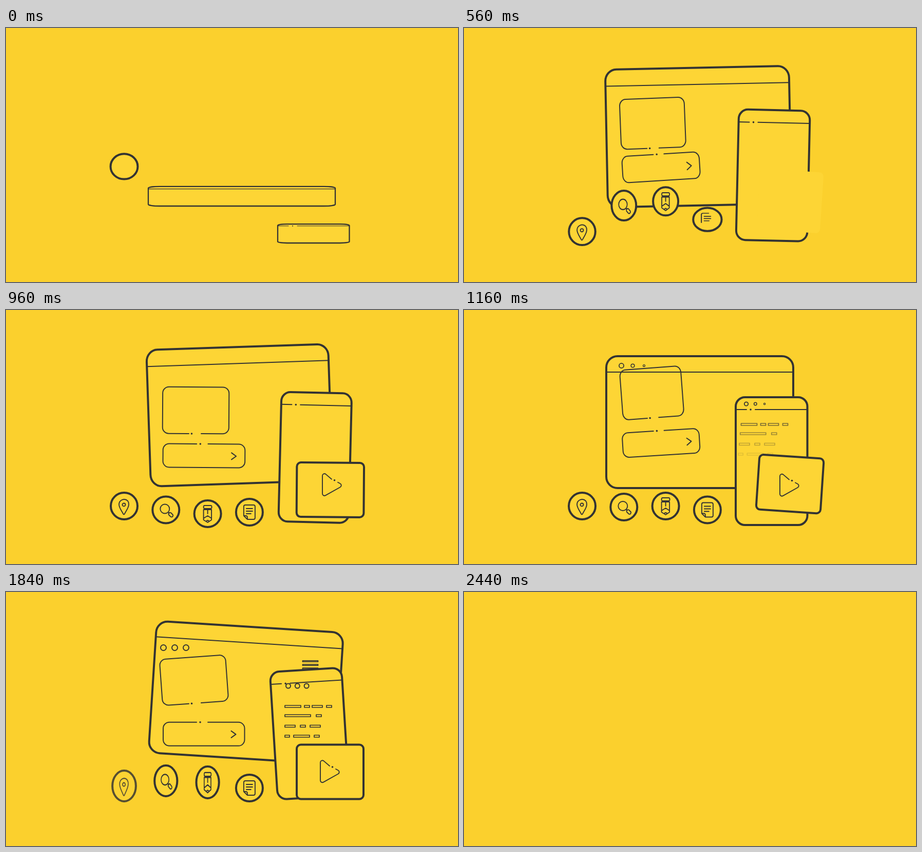
Write an HTML page with a canvas that moves like this. It is 880x495 px and loops after 2560 ms.

```html
<!DOCTYPE html>
<html lang="en">
<head>
<meta charset="utf-8">
<title>Interface line art</title>
<style>
  html, body { margin: 0; width: 100%; height: 100%; overflow: hidden; background: #fbd02d; }
  canvas { display: block; width: 880px; height: 495px; }
</style>
</head>
<body>
<canvas width="880" height="495"></canvas>
<script>
const ctx = document.querySelector('canvas').getContext('2d');
const LOOP = 2560, STEP = 40, INK = '#333', FILL = '#fdd535';

const clamp = v => Math.max(0, Math.min(1, v));
const ramp = (t, from, length) => clamp((t - from) / length);
const ease = p => (1 - Math.cos(Math.PI * p)) / 2;

// Rows are [time, ...values]; returns the eased values at time t.
function mix(rows, t) {
  let i = 0;
  while (i < rows.length - 2 && t >= rows[i + 1][0]) i++;
  const [a, b] = [rows[i], rows[i + 1]];
  const p = ease(ramp(t, a[0], b[0] - a[0]));
  return a.slice(1).map((v, k) => v + (b[k + 1] - v) * p);
}

// Pose rows: time, lift, degrees, scale x, scale y, around the bottom centre.
function makePart({ x, y, start, drop, low, high, leave, hop, lean }) {
  const rows = [
    [start, drop, 0, 1, .148],
    [start + 160, drop * .3 + high[1] * 1.75, high[2], .95, 1.12],
    low, high,
    [high[0] + 380, 0, 0, 1, 1],
    [leave, 0, 0, 1, 1],
    [leave + 140, hop, lean, 1, 1],
    [leave + 300, 10, -lean / 2, 1.03, .97],
    [leave + 410, -8, 0, .8, 1.05],
    [leave + 570, 0, 0, 0, 0],
  ];
  return { x, y, rows, start, end: leave + 570 };
}

const browser = makePart({ x: 459, y: 347, start: 0, drop: 0, low: [320, 23, 2.9, 1.04, 1],
  high: [760, -19.5, -4.2, .94, 1.077], leave: 1690, hop: -23, lean: 3.7 });
const phone = makePart({ x: 598.5, y: 419, start: 0, drop: 0, low: [320, 5, -1, 1.04, 1.01],
  high: [760, -12, 3, .957, 1.03], leave: 1690, hop: -19, lean: -3.6 });
const picture = makePart({ x: 369.5, y: 231, start: 310, drop: 98, low: [760, 41, 5, 1.085, .94],
  high: [1160, -21, -4.3, .925, 1.08], leave: 1710, hop: -14.5, lean: -4.2 });
const search = makePart({ x: 385, y: 300, start: 400, drop: 90, low: [760, 31, 4.5, 1.07, .96],
  high: [1160, -17, -3.6, .945, 1.04], leave: 1830, hop: -16, lean: 3.6 });
const card = makePart({ x: 631, y: 404, start: 400, drop: 40, low: [760, 11, -3, 1.046, .99],
  high: [1160, -11, 3.8, .965, 1.01], leave: 1850, hop: -14, lean: 3.6 });

// Builds the path inside the part's pose, strokes it outside so lines keep their weight.
function draw(part, t, width, build, filled) {
  if (t < part.start || t >= part.end) return;
  const [lift, turn, sx, sy] = mix(part.rows, t);
  ctx.save();
  ctx.translate(part.x, part.y + lift);
  ctx.rotate(turn * Math.PI / 180);
  ctx.scale(sx, sy);
  ctx.translate(-part.x, -part.y);
  ctx.beginPath();
  build();
  ctx.restore();
  if (filled) ctx.fill();
  ctx.lineWidth = width * Math.min(1, .5 + sy / 2);
  ctx.stroke();
}

function line(...points) {
  points.forEach(([x, y], i) => i ? ctx.lineTo(x, y) : ctx.moveTo(x, y));
}
const dot = (x, y) => line([x, y], [x + .05, y]);

// Rounded box with a gap from gapA to gapB in the edge at y0.
function openBox(x0, y0, x1, y1, r, gapA, gapB) {
  ctx.moveTo(gapA, y0);
  ctx.arcTo(x0, y0, x0, y1, r);
  ctx.arcTo(x0, y1, x1, y1, r);
  ctx.arcTo(x1, y1, x1, y0, r);
  ctx.arcTo(x1, y0, x0, y0, r);
  ctx.lineTo(gapB, y0);
}

function circle(x, y, rx, ry = rx) {
  ctx.beginPath();
  ctx.ellipse(x, y, rx, ry, 0, 0, 7);
}

const ICONS = [
  'M7 -10A10 10 0 0 0 -10 -3C-10 3 -4 11 -2 15Q-.5 18 1 15C3 11 9 3 9 -3A10 10 0 0 0 7 -10M2.5 -2.5a3 3 0 1 0 -6 0a3 3 0 1 0 6 0',
  'M7 -2a9 9 0 1 0 -18 0a9 9 0 1 0 18 0M4.5 4.5l2 2M5.5 9.5l4 4q2 1 3.500 -.5t.5 -3.500l-4 -4q-2 -1 -3.500 .5t-.5 3.500',
  'M-6 -16h12q2 0 2 3t-2 3h-12q-2 0 -2 -3t2 -3M-8 9v-17h15.500v17M0 -8v8M-8 9l8 -5l7.500 5M-8 9v3l8 5l7.500 -5v-3M-3 15q3 -4 6 0',
  'M-11 7V-11q0 -3 3 -3H8q3 0 3 3V11q0 3 -3 3H-4L-11 7h4q3 0 3 3v4M-6 -7h12M-6 -2h12M-6 3h9',
].map(d => new Path2D(d));

const DROP = [
  [-100, 200, 1, 1], [120, 363, 1.04, .88], [170, 418, 1.15, .85], [220, 387, 1.12, .79],
  [320, 347, .96, 1.02], [390, 332, .93, 1.08], [460, 346, .92, 1.12], [590, 404, 1, 1],
  [660, 394, 1, 1], [760, 397, 1, 1], [860, 389.5, 1, 1], [960, 382, 1, 1],
  [1060, 384, 1, 1], [1160, 382, 1, 1],
];
const EXIT = [
  [0, 382, 1, 1, 1], [60, 371, .85, 1.19, 1], [100, 368, .85, 1.15, 1],
  [140, 378, .88, 1.15, .82], [260, 404, .8, 1.1, 0],
];
const EXIT_START = [1700, 1740, 1780, 1840];

function badge(i, t) {
  const age = t - i * 100, leaving = t - EXIT_START[i];
  if (age < 0 || leaving >= 260) return;
  const [y, sx, sy, alpha = 1] = leaving > 0 ? mix(EXIT, leaving) : mix(DROP, age);
  const x = 230 + i * 81.3;
  ctx.save();
  ctx.globalAlpha = alpha;
  circle(x, y, 26 * sx, 26 * sy);
  ctx.fill();
  ctx.lineWidth = 4;
  ctx.stroke();
  const drawn = ramp(age, 150, 300);
  if (drawn) {
    ctx.translate(x, y);
    ctx.scale(sx, sy);
    ctx.lineWidth = 1.9;
    if (drawn < 1) ctx.setLineDash([drawn * 90, 999]);
    ctx.stroke(ICONS[i]);
  }
  ctx.restore();
}

function threeDots(t, x, y, gap, r) {
  for (let i = 0; i < 3; i++) {
    const size = ease(ramp(t, 1000 + i * 35, 220)) * (1 - ramp(t, 1950 + i * 50, 150));
    if (!size) continue;
    circle(x + i * gap, y, r * size);
    ctx.lineWidth = .8 + 1.2 * size;
    ctx.stroke();
  }
}

function menu(t) {
  ctx.lineWidth = 1.7;
  for (let i = 0; i < 3; i++) {
    const [w] = mix([[0, 0], [160, 34], [400, 30], [610, 30], [760, 0]], t - 1340 - i * 45);
    if (w > 0) ctx.strokeRect(577.5, 133.8 + i * 7.2, w, 2.2);
  }
}

const TEXT = [
  [223, 543, 31, 581, 10, 596, 20, 624, 10],
  [241, 543, 50, 604, 10],
  [261.5, 543, 20, 573, 10, 592, 20],
  [281, 543, 9, 560, 31, 600, 10],
];

function textRows(t) {
  ctx.save();
  ctx.lineWidth = 1.7;
  TEXT.forEach(([y, ...bars], row) => {
    const shown = ramp(t, 1030 + row * 35, 200);
    ctx.globalAlpha = shown * (1 - ramp(t, 1930 + row * 40, 150));
    for (let i = 0; i < bars.length; i += 2)
      ctx.strokeRect(bars[i] - 10 * (1 - shown), y - 2, bars[i + 1], 4);
  });
  ctx.restore();
}

function playIcon(t) {
  const drawn = ramp(t, 560, 200), size = 1 - ramp(t, 2150, 200);
  if (!drawn || !size) return;
  const [dx, dy] = mix([[600, 6, -11], [760, 5, -10], [1160, 3, -8.5], [1520, 2, -4], [1840, 0, 0]], t);
  ctx.save();
  ctx.translate(631 + dx, 350 + dy);
  ctx.scale(size, size);
  ctx.lineWidth = 1.9;
  if (drawn < 1) ctx.setLineDash([drawn * 130, 999]);
  ctx.beginPath();
  ctx.moveTo(11, -5);
  ctx.arcTo(22, 1, -19, 24, 4);
  ctx.arcTo(-19, 24, -19, -25, 4);
  ctx.arcTo(-19, -25, 22, 1, 4);
  ctx.lineTo(-1, -11);
  ctx.stroke();
  ctx.lineWidth = 3.6;
  ctx.beginPath();
  dot(4.500, -9);
  ctx.stroke();
  ctx.restore();
}

function videoCard(t) {
  const half = Math.max(0, (t - 624) * .72), middle = 242;
  ctx.save();
  if (half < middle) {
    ctx.setLineDash([half * 2, 999]);
    ctx.lineDashOffset = half - middle;
  }
  const trace = () => ctx.roundRect(566, 297.5, 130, 106, 8);
  draw(card, t, half ? 4 : .01, trace, true);
  ctx.restore();
  playIcon(t);
}

function render(t) {
  ctx.fillStyle = '#fbd02d';
  ctx.fillRect(0, 0, 880, 495);
  ctx.fillStyle = FILL;
  ctx.strokeStyle = INK;
  ctx.lineCap = ctx.lineJoin = 'round';

  draw(browser, t, 4, () => ctx.roundRect(277, 90, 364, 257, 22), true);
  draw(browser, t, 2, () => line([277, 121], [641, 121]));
  threeDots(t, 306.5, 108.5, 22, 5.5);
  menu(t);

  draw(picture, t, 2, () => openBox(305, 231, 433.5, 141, 12, 356, 380));
  draw(picture, t, 3.6, () => dot(361.5, 231));
  draw(search, t, 2, () => openBox(306, 254, 464.5, 300, 12, 371, 393));
  draw(search, t, 3.6, () => dot(378, 254));
  draw(search, t, 2, () => line([438.5, 271], [447.5, 277.5], [438.5, 284]));

  for (let i = 0; i < 4; i++) badge(i, t);

  draw(phone, t, 4, () => ctx.roundRect(529, 170, 139.500, 249, 18), true);
  draw(phone, t, 2, () => { line([529, 194], [550, 194]); line([567, 194], [668, 194]); });
  draw(phone, t, 3.6, () => dot(558, 194));
  threeDots(t, 549.5, 183, 17.8, 4.5);
  textRows(t);
  videoCard(t);
}

const begin = performance.now();
function tick() {
  const t = (performance.now() - begin) % LOOP;
  render(Math.floor(t / STEP) * STEP);
  requestAnimationFrame(tick);
}
tick();
</script>
</body>
</html>
```
